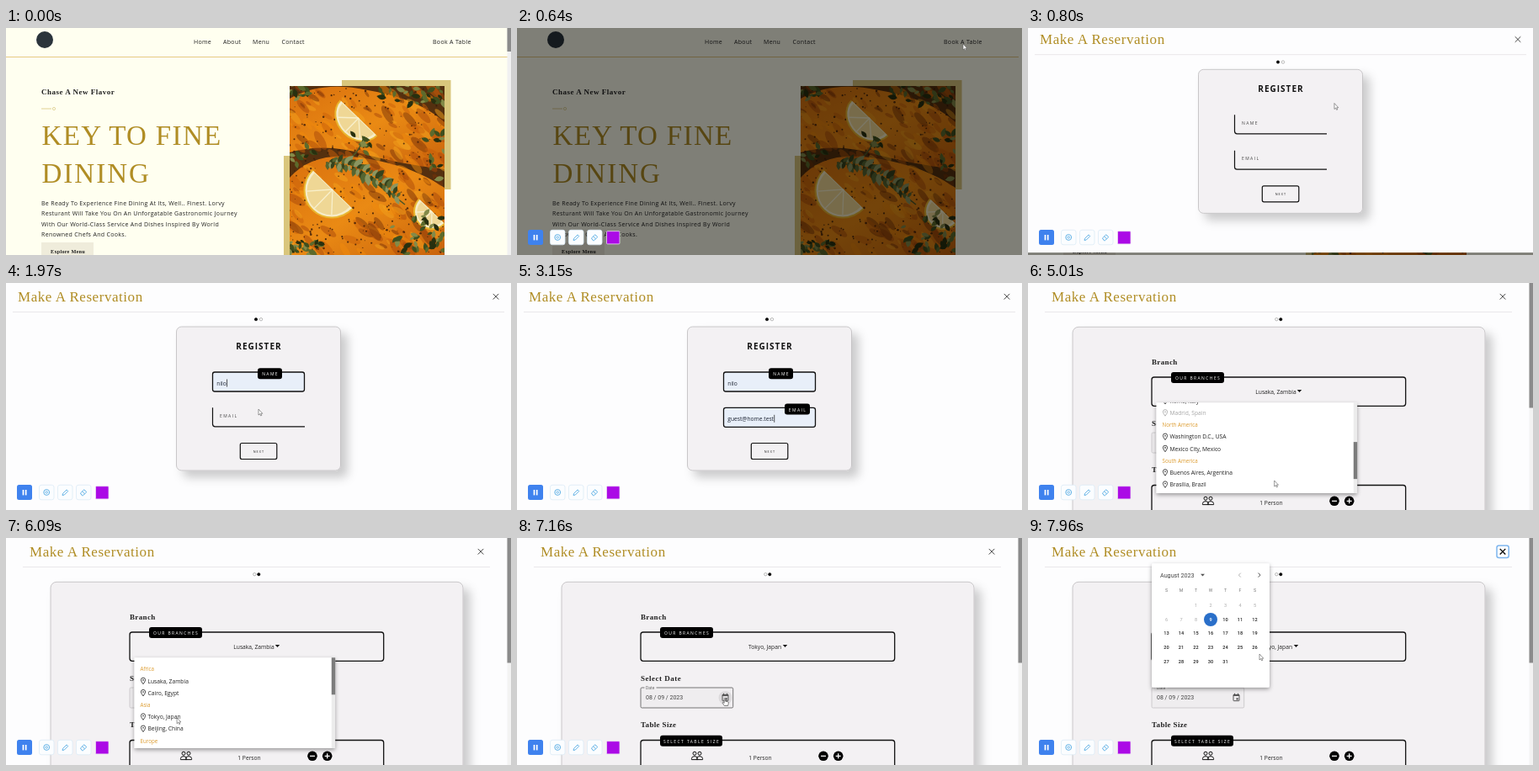
Recreate the animation shown at these times as an HTML page. Size 600x270 px, loop 8000 ms.

```html
<!DOCTYPE html>
<html lang="en">
<head>
<meta charset="utf-8">
<title>Table reservation</title>
<style>
html, body { margin: 0; width: 100%; height: 100%; overflow: hidden; background: #fffff0; }
svg { display: block; width: 600px; height: 270px; }
text { font-family: "Open Sans", sans-serif; white-space: pre; }
text.serif { font-family: "Liberation Serif", serif; }
text.robo { font-family: Roboto, sans-serif; }
</style>
</head>
<body>
<svg id="stage" viewBox="0 0 600 270"></svg>
<script>
const LOOP = 8000;
const INK = '#111', GOLD = '#b08d24', CARD = '#f3f1f3';

// ---------- markup helpers ----------
const txt = (x, y, s, size, o = {}) =>
  `<text x="${x}" y="${y}" font-size="${size}" fill="${o.fill || '#222'}" class="${o.font || ''}"` +
  ` font-weight="${o.weight || 400}" letter-spacing="${o.ls || 0}" text-anchor="${o.anchor || 'start'}"` +
  `${o.id ? ` id="${o.id}"` : ''}>${s}</text>`;
const box = (x, y, w, h, fill, more = '') =>
  `<rect x="${x}" y="${y}" width="${w}" height="${h}" fill="${fill}" ${more}/>`;
const dot = (x, y, r, fill, more = '') => `<circle cx="${x}" cy="${y}" r="${r}" fill="${fill}" ${more}/>`;
const line = (d, stroke, w = 1, more = '') =>
  `<path d="${d}" fill="none" stroke="${stroke}" stroke-width="${w}" ${more}/>`;
const group = (id, inner, more = '') => `<g id="${id}" ${more}>${inner}</g>`;
const tag = (x, y, w, s) => box(x, y, w, 13, '#000', 'rx="3"') +
  txt(x + w / 2 + .6, y + 9, s, 5, { fill: '#fff', ls: 1.4, anchor: 'middle' });

let seed = 7;
const rnd = () => (seed = (seed * 16807) % 2147483647) / 2147483647;

// ---------- landing page ----------
const leaf = (x, y, turn, size, fill) =>
  `<path d="M0 0Q4-5 10 0Q4 5 0 0" fill="${fill}" transform="translate(${x} ${y}) rotate(${turn}) scale(${size})"/>`;

function leaves(x, y, dx, dy, n) {
  let s = '';
  for (let i = 0; i < n; i++) {
    const tone = ['#3f4f1e', '#5d6a2c', '#28300f', '#838a48'][i % 4];
    s += leaf(x + (rnd() - .5) * dx, y + (rnd() - .5) * dy, rnd() * 360, .6 + rnd() * .6, tone);
  }
  return s;
}

function sprig() {
  let s = line('M380 160Q415 162 474 210M398 163Q420 150 425 130', '#4d5526', 1.6);
  for (let i = 0; i < 46; i++) {
    const k = i / 46, x = 382 + 84 * k, y = 159 + 44 * k * k;
    s += leaf(x, y, (i % 2 ? -70 : 60) + rnd() * 60, .7 + rnd() * .8,
      ['#566530', '#36431c', '#8b9560'][i % 3]);
  }
  return s + leaves(422, 140, 18, 24, 9);
}

// Irregular blotches that give the glaze its uneven colour.
function blotches(n) {
  let s = '';
  for (let i = 0; i < n; i++) {
    const x = 337 + rnd() * 184, y = 72 + rnd() * 198, r = 2 + rnd() * 6;
    const fill = ['#f3a11c', '#a9480a', '#f08a0c', '#c95f0a', '#7a3308'][i % 5];
    s += `<ellipse rx="${r * 1.6}" ry="${r * .6}" fill="${fill}" opacity=".5"` +
      ` transform="translate(${x} ${y}) rotate(${20 + rnd() * 40})"/>`;
  }
  return s;
}

const lemon = (x, y, rx, ry) => `<g transform="translate(${x} ${y}) rotate(44)">` +
  `<path d="M${-rx} 0A${rx} ${ry} 0 0 0 ${rx} 0Z" fill="#e9b630"/>` +
  `<path d="M${2 - rx} 0A${rx - 2} ${ry - 2} 0 0 0 ${rx - 2} 0Z" fill="#f6ecc8"/>` +
  `<path d="M${5 - rx} 1A${rx - 5} ${ry - 5} 0 0 0 ${rx - 5} 1Z" fill="#efd795"/>` +
  line(`M0 0L0 ${ry - 3}M0 0L${-rx * .6} ${ry * .65}M0 0L${rx * .6} ${ry * .65}`, '#f8f0cc', 1.3) + '</g>';

function photo() {
  let s = box(337, 69, 184, 201, '#54300f');
  s += '<path d="M337 84Q375 62 430 74Q490 84 521 112V168Q470 162 425 150Q380 136 337 148Z" fill="url(#fish)"/>';
  s += '<path d="M337 178Q365 146 420 154Q480 162 521 190V270H337Z" fill="url(#fish)"/>';
  s += blotches(230);
  for (let i = 0; i < 330; i++)
    s += dot(337 + rnd() * 184, 72 + rnd() * 198, .4 + rnd() * .9, '#35190a', 'opacity=".8"');
  s += leaves(345, 76, 30, 16, 14) + leaves(485, 80, 80, 24, 34) + leaves(512, 150, 20, 60, 14) +
    leaves(358, 260, 44, 20, 24) + leaves(350, 150, 26, 16, 10);
  s += lemon(419, 107, 31, 26) + lemon(388, 192, 34, 35) + lemon(506, 218, 22, 22);
  s += leaves(492, 245, 60, 46, 40) + sprig();
  return `<g clip-path="url(#photoClip)">${s}</g>`;
}

function landing() {
  const nav = [[223, 'Home'], [258, 'About'], [293, 'Menu'], [327.5, 'Contact'], [507, 'Book A Table']];
  const copy = [
    'Be Ready To Experience Fine Dining At Its, Well.. Finest. Lorvy',
    'Resturant Will Take You On An Unforgatable Gastronomic Journey',
    'With Our World-Class Service And Dishes Inspired By World',
    'Renowned Chefs And Cooks.'];
  return box(0, 0, 600, 270, '#fffff0') + dot(46, 14, 10, '#2b343c') +
    nav.map(([x, s]) => txt(x, 19, s, 7, { ls: .32 })).join('') +
    box(0, 34, 596, 1, '#e6c985') +
    txt(42, 79, 'Chase A New Flavor', 9, { font: 'serif', weight: 700, ls: .5 }) +
    line('M42 96H54', '#d9c67c', .8) + dot(57, 96, 1.6, 'none', 'stroke="#d9c67c" stroke-width=".7"') +
    txt(42.5, 138.5, 'KEY TO FINE', 33, { font: 'serif', fill: GOLD, ls: 1.35 }) +
    txt(42.5, 184, 'DINING', 33, { font: 'serif', fill: GOLD, ls: 2 }) +
    copy.map((s, i) => txt(42, 211 + i * 12.3, s, 7, { ls: .32 })).join('') +
    box(42, 255, 62, 20, '#efecdb') +
    txt(53, 267.5, 'Explore Menu', 6.2, { font: 'serif', weight: 700, ls: .25 }) +
    box(399, 62, 129.5, 130, '#d9c67c') + box(330, 152, 120, 118, '#d9c67c') + photo() +
    group('pageBar', box(595.5, 0, 4.5, 270, '#f1f1f1') + box(595.5, 0, 4.5, 28, '#8b8b8b'));
}

// ---------- reservation panel ----------
const header = (x, left, right, closeX) =>
  txt(x, 21.5, 'Make A Reservation', 17, { font: 'serif', fill: GOLD, ls: .55 }) +
  box(left, 34, right - left, .8, '#e6e3e6') +
  line(`M${closeX - 3.3} 12.9l6.6 6.6m0-6.6l-6.6 6.6`, '#444', 1);
const steps = (a, b, on) => [a, b].map((x, i) =>
  dot(x, 43.2, 1.7, i === on ? '#000' : '#fff', `stroke="${i === on ? '#000' : '#777'}" stroke-width=".5"`)).join('');

const field = (id, y, label, tagX, tagW) =>
  group(id + 'Idle', line(`M245.5 ${y}v19.5q0 3 3 3h106.5`, INK, 1.2) +
    txt(254, y + 11.3, label, 5, { ls: 1.4, fill: '#444' })) +
  group(id + 'Live', box(245.5, y, 109, 23, CARD, `id="${id}Box" rx="2.5" stroke="${INK}" stroke-width="1.3"`) +
    group(id + 'Tag', tag(tagX, y - 4.7, tagW, label)) +
    txt(250.3, y + 15.5, '', 6.7, { id: id + 'Text', fill: '#1d2433' }) +
    box(0, y + 8.5, .7, 9, INK, `id="${id}Caret"`));

const register = () => header(14, 8, 592, 582) + steps(297, 303, 0) +
  box(202.5, 52, 195, 171, CARD, 'rx="6" stroke="#bdbabd" stroke-width=".8" filter="url(#soft)"') +
  txt(300.5, 79, 'REGISTER', 10, { weight: 700, ls: 1, anchor: 'middle', fill: INK }) +
  field('name', 106, 'NAME', 299, 29) + field('mail', 148.3, 'EMAIL', 318, 30) +
  box(278.3, 190.5, 43.5, 19, CARD, `rx="2" stroke="${INK}" stroke-width="1.2"`) +
  txt(300.5, 201.7, 'NEXT', 3.8, { ls: 1.1, anchor: 'middle' });

// A leading # marks a region heading, a leading - an unavailable branch.
const branches = ['#Africa', 'Lusaka, Zambia', 'Cairo, Egypt', '#Asia', 'Tokyo, Japan', 'Beijing, China',
  '#Europe', 'Rome, Italy', '-Madrid, Spain', '#North America', 'Washington D.C., USA', 'Mexico City, Mexico',
  '#South America', 'Buenos Aires, Argentina', 'Brasília, Brazil', '#Oceania', 'Sydney, Australia',
  'Suva, Fiji'];

function branchRow(s, i) {
  const y = 158.4 + i * 14.2;
  if (s[0] === '#') return txt(159.5, y, s.slice(1), 6.2, { fill: '#dc9a2c' });
  const off = s[0] === '-', fill = off ? '#a5a5a5' : '#222';
  return line(`M163 ${y + 1.2}q-2.6-3.3-2.6-5a2.6 2.6 0 0 1 5.2 0q0 1.7-2.6 5Z`, fill, .8) +
    dot(163, y - 3.7, .8, fill) + txt(168.5, y, off ? s.slice(1) : s, 6.7, { fill });
}

const dropdown = () => box(152.5, 142.3, 238.5, 107.7, '#fff', 'filter="url(#lift)"') +
  `<g clip-path="url(#listClip)">${group('rows', branches.map(branchRow).join(''))}</g>` +
  box(386.8, 142.3, 4.4, 107.7, '#ececec') + box(386.8, 142, 4.4, 44, '#7c7c7c', 'id="thumb"');

const person = (x, y) => dot(x, y - 2.8, 2, 'none', `stroke="${INK}" stroke-width="1"`) +
  line(`M${x - 3.6} ${y + 4.6}v-1q0-3 3.6-3t3.6 3v1Z`, INK, 1);

function calendar() {
  const col = i => 164.5 + 17.5 * i;
  let s = box(147, 30.3, 140, 147.5, '#fff', 'rx="2" filter="url(#lift)"') +
    txt(157, 46.6, 'August 2023', 7.2, { font: 'robo', fill: '#444' }) +
    '<path d="M205 42.8h5l-2.5 2.6Z" fill="#555"/>' +
    line('M252.8 41.6l-2.4 2.5 2.4 2.5', '#aaa', .9) + line('M273.6 41.6l2.4 2.5-2.4 2.5', '#444', .9) +
    dot(217, 97, 8, '#2a6fc9');
  [...'SMTWTFS'].forEach((d, i) => s += txt(col(i), 64.4, d, 5.2, { font: 'robo', fill: '#777', anchor: 'middle' }));
  for (let d = 1; d <= 31; d++) {
    const cell = d + 1, fill = d < 9 ? '#ababab' : d === 9 ? '#fff' : '#222';
    s += txt(col(cell % 7), 82 + Math.floor(cell / 7) * 16.7, d, 5.6,
      { font: 'robo', fill, weight: d < 9 ? 400 : 500, anchor: 'middle' });
  }
  return s;
}

const details = () => header(28, 20, 575, 564) + steps(295.3, 300.3, 1) +
  group('closeFocus', box(557, 9, 14.2, 14.4, '#fff', 'rx="2.5" stroke="#7db5ee" stroke-width="1.5"') +
    line('M560.7 12.9l6.6 6.6m0-6.6l-6.6 6.6', '#000', 1.3)) +
  box(53, 52.3, 490, 300, CARD, 'rx="7" stroke="#bdbabd" stroke-width=".8" filter="url(#soft)"') +
  txt(147, 97, 'Branch', 9, { font: 'serif', weight: 700, ls: .35 }) +
  box(147, 112, 301.7, 34.3, CARD, `rx="3" stroke="${INK}" stroke-width="1.3"`) + tag(170, 106, 63, 'OUR BRANCHES') +
  txt(294.5, 131.6, '', 6.7, { id: 'branch', anchor: 'middle' }) +
  '<path id="arrow" d="M-2.7 127h5.4l-2.7 3Z" fill="#111"/>' +
  txt(147, 170, 'Select Date', 9, { font: 'serif', weight: 700, ls: .5 }) +
  box(147, 178, 109.7, 24, '#efedef', 'id="dateBox" rx="1.5" stroke-width=".8"') +
  box(151.5, 176, 14, 4, CARD) + txt(153, 179.6, 'Date', 5, { font: 'robo', fill: '#666' }) +
  txt(153, 192.4, '08 / 09 / 2023', 7, { font: 'robo', fill: '#444' }) +
  group('iconHover', dot(247.5, 190, 8, '#dddbdd')) +
  box(244, 186.3, 7, 7.4, 'none', 'rx=".6" stroke="#555" stroke-width="1"') +
  box(244, 186, 7, 2, '#555') + box(247.5, 190.3, 2.2, 2.2, '#555') +
  line('M245.5 184.8v1.5M249.5 184.8v1.5', '#555', 1) +
  txt(147, 225, 'Table Size', 9, { font: 'serif', weight: 700, ls: .35 }) +
  box(147, 240.5, 301.7, 60, CARD, `rx="3" stroke="${INK}" stroke-width="1.3"`) +
  tag(170, 234.7, 74, 'SELECT TABLE SIZE') + person(211, 259) + person(217, 259) +
  txt(289, 264, '1 Person', 6.7, { anchor: 'middle' }) +
  dot(364, 259.3, 5.8, '#000') + dot(381.7, 259.3, 5.8, '#000') +
  line('M361 259.3h6M378.7 259.3h6m-3-3v6', '#fff', 1.3) +
  group('list', dropdown()) +
  box(595.5, 0, 4.5, 270, '#f3f3f3') + box(595.5, 0, 4.5, 148.5, '#8b8b8b') +
  group('calendar', calendar());

// ---------- recorder toolbar and pointer ----------
const toolbar = () => box(13, 240, 18, 18, '#3f82ee', 'rx="2.5"') +
  box(19.6, 246, 1.7, 6.4, '#fff') + box(22.8, 246, 1.7, 6.4, '#fff') +
  [39.5, 61.5, 83.5].map(x => box(x, 240.3, 17.5, 17.5, '#fbfdff', 'rx="2.5" stroke="#dcebf7" stroke-width=".8"')).join('') +
  dot(48.2, 249, 3.4, 'none', 'stroke="#62b2e6"') + dot(48.2, 249, 1.3, 'none', 'stroke="#62b2e6" stroke-width=".8"') +
  line('M67 252.5l.6-2.2 4.4-4.4 1.7 1.7-4.4 4.4Z', '#62b2e6', 1) +
  line('M88.4 250l4.4-4.2 3 2.8-4.4 4.2h-1Zm2.2-2l3 2.8', '#62b2e6', 1) +
  box(106.5, 241.7, 15.5, 15.2, '#ab0ae6', 'rx="1" stroke="#eadcf2" stroke-width=".8"');

const pointer = () => group('arrowPtr', '<path d="M0 0v7l1.6-1.4 1.1 2.3 1.1-.5-1.1-2.2h2.1Z" fill="#fff" stroke="#555" stroke-width=".6"/>') +
  group('handPtr', '<path d="M-.8 0q.8-1 1.5 0v3.2l3 .7q.8.4.6 1.5l-.7 3.1h-4.2l-2.2-3.2q0-1 1-.7l1 .8Z" fill="#fff" stroke="#333" stroke-width=".6"/>');

const shadow = (id, dx, dy, blur, alpha) =>
  `<filter id="${id}" x="-20%" y="-20%" width="150%" height="150%"><feDropShadow dx="${dx}" dy="${dy}" stdDeviation="${blur}" flood-color="#000" flood-opacity="${alpha}"/></filter>`;

document.getElementById('stage').innerHTML =
  '<defs>' + shadow('soft', 8, 8, 6, .2) + shadow('lift', 0, 2, 2.5, .38) +
  '<linearGradient id="fish" x2="1" y2="1"><stop stop-color="#d9700e"/><stop offset=".5" stop-color="#ea8a14"/><stop offset="1" stop-color="#c9630c"/></linearGradient>' +
  '<clipPath id="photoClip"><rect x="337" y="69" width="184" height="201"/></clipPath>' +
  '<clipPath id="listClip"><rect x="152.5" y="142.3" width="234" height="107.7"/></clipPath></defs>' +
  landing() + box(0, 0, 600, 270, '#000', 'id="shade"') +
  group('panel', box(0, 0, 600, 270, '#fdfdfe') + group('step1', register()) + group('step2', details()),
    'clip-path="inset(0)"') +
  group('tools', toolbar()) + group('pointer', pointer());

// ---------- motion ----------
const ui = {};
document.querySelectorAll('svg [id]').forEach(e => ui[e.id] = e);
const clamp = v => Math.min(1, Math.max(0, v));
const span = (t, a, b) => clamp((t - a) / (b - a));
const ease = k => k * k * (3 - 2 * k);
const show = (id, on) => { ui[id].style.display = on ? '' : 'none'; };
const set = (id, attr, v) => ui[id].setAttribute(attr, v);

const path = [[120, 330, 190], [450, 530, 19], [650, 530, 19], [800, 364, 89.5], [1000, 300, 118],
  [1800, 300, 118], [2050, 300, 160], [3250, 302, 162], [3500, 300, 200], [3850, 300, 200],
  [4200, 300, 130], [4400, 300, 130], [4650, 292.7, 235], [5610, 292.7, 235], [6150, 200, 213],
  [6380, 200, 213], [7000, 247, 191], [7500, 247, 191], [7880, 275, 138], [8000, 275, 138]];

function pointerAt(t) {
  let i = 0;
  while (i < path.length - 2 && t > path[i + 1][0]) i++;
  const [a, ax, ay] = path[i], [b, bx, by] = path[i + 1], k = ease(span(t, a, b));
  return [ax + (bx - ax) * k, ay + (by - ay) * k];
}

function drawField(id, t, value, focus, typeFrom, typeTo, blur) {
  const live = t >= focus, k = ease(span(t, focus, focus + 150));
  const n = Math.floor(span(t, typeFrom, typeTo) * value.length);
  show(id + 'Idle', !live);
  show(id + 'Live', live);
  set(id + 'Tag', 'transform', `translate(${-50 * (1 - k)} ${9 * (1 - k)})`);
  set(id + 'Tag', 'opacity', k);
  set(id + 'Box', 'fill', t > typeTo + 60 ? '#e8eff9' : CARD);
  ui[id + 'Text'].textContent = value.slice(0, n);
  show(id + 'Caret', live && t < blur);
  if (live) set(id + 'Caret', 'x', 250.8 + (n ? ui[id + 'Text'].getComputedTextLength() : 0));
}

function draw(t) {
  show('pageBar', t < 530);
  show('tools', t >= 150);
  set('shade', 'opacity', .5 * span(t, 530, 620));
  show('panel', t > 640);
  set('panel', 'transform', `translate(0 ${-270 * (1 - ease(span(t, 640, 811)))})`);

  const second = t >= 3680;
  show('step1', !second);
  show('step2', second);
  if (!second) {
    drawField('name', t, 'nilo', 1050, 1250, 1650, 2080);
    drawField('mail', t, 'guest@home.test', 2080, 2250, 2800, 3550);
  } else {
    const picked = t >= 6340;
    ui.branch.textContent = picked ? 'Tokyo, Japan' : 'Lusaka, Zambia';
    set('arrow', 'transform', `translate(${picked ? 318.5 : 322.5} 0)`);
    show('list', t >= 4400 && t < 6340);
    const scroll = 115 * (ease(span(t, 4680, 4990)) - ease(span(t, 5630, 5980)));
    set('rows', 'transform', `translate(0 ${-scroll})`);
    set('thumb', 'y', 142.3 + scroll * .407);

    const hover = t >= 6900 && t < 7560;
    set('dateBox', 'stroke', hover ? '#555' : '#c4c2c4');
    show('iconHover', hover);
    const k = ease(span(t, 7500, 7680));
    show('calendar', k > 0);
    set('calendar', 'opacity', k);
    set('calendar', 'transform', `translate(217 104) scale(${.8 + .2 * k}) translate(-217 -104)`);
    show('closeFocus', t >= 7520);
  }

  const hidden = t < 120 || (t > 1200 && t < 1800) || (t > 2200 && t < 3250);
  const [x, y] = pointerAt(t), hand = t >= 6900 && t < 7560;
  show('pointer', !hidden);
  show('handPtr', hand);
  show('arrowPtr', !hand);
  set('pointer', 'transform', `translate(${x} ${y})`);
}

const start = performance.now();
function tick() {
  draw((performance.now() - start) % LOOP);
  requestAnimationFrame(tick);
}
tick();
</script>
</body>
</html>
```
